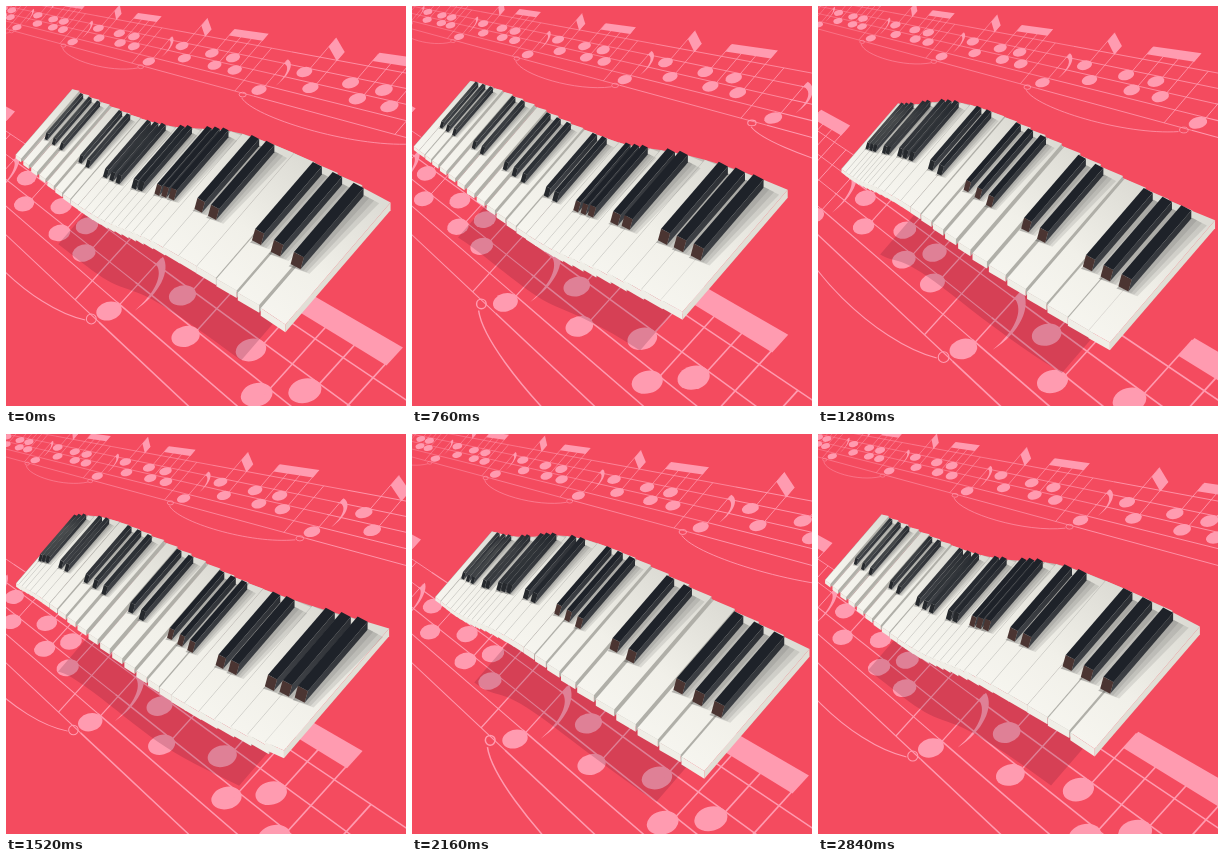
An HTML page with a canvas that plays this animation: 400x400 px, repeating every 2880 ms.

```html
<!DOCTYPE html>
<html lang="en">
<head>
<meta charset="utf-8">
<title>Piano wave</title>
<style>
  html, body { margin: 0; width: 100%; height: 100%; overflow: hidden; background: #f44b5f; }
  canvas { display: block; width: 100vw; height: 100vh; }
</style>
</head>
<body>
<canvas id="stage" width="400" height="400"></canvas>
<script>
const ctx = document.getElementById('stage').getContext('2d');
const LOOP = 2880, STEP = 40, TAU = Math.PI * 2;
const RED = '#f44b5f', PINK = '#ff9bb0';

function polygon(points, fill) {
  ctx.beginPath();
  points.forEach(([x, y]) => ctx.lineTo(x, y));
  ctx.closePath();
  ctx.fillStyle = fill;
  ctx.fill();
}

function line(a, b, color, width) {
  ctx.beginPath();
  ctx.moveTo(...a);
  ctx.lineTo(...b);
  ctx.strokeStyle = color;
  ctx.lineWidth = width;
  ctx.stroke();
}

const add = ([x, y], [dx, dy], k = 1) => [x + dx * k, y + dy * k];

// ---- Music staves: u runs away along the staff, v runs across it ----

const BAR = 720;
const NOTES = [[0, 0], [-126, 57], [-203, 29], [-335, 55], [-405, 29], [-467, 55], [-528, 29]];
const STEM_TOPS = [74, 138, 112, 120, 121, 122, 123];
const LINES = [-15, 12, 39, 66, 93];
const STEM = -11;

// Slurs join every second pair of bars; slurParity tells which pair
const staves = [
  { vanish: [-350, -72], origin: [603, 156], across: [.351, -.41], depth: 3220, bars: 5,
    note: [7.8, 4.7], ring: [3.6, 2.4], stroke: .75, slurParity: 0, near: 2, far: 7 },
  { vanish: [-390, -137], origin: [493, 442], across: [.67, -.74], depth: 2023, bars: 4,
    note: [12.9, 9.3], ring: [5, 5], stroke: 1.25, slurParity: 1, near: 2, far: 2 },
];

function drawStaff(staff, time) {
  const travel = time / LOOP * staff.bars * BAR;
  const scale = u => staff.depth / (staff.depth + u);
  const at = (u, v) => {
    const s = scale(u);
    return staff.vanish.map((c, i) => c + s * (staff.origin[i] + v * staff.across[i]));
  };
  const segment = (u1, v1, u2, v2) =>
    line(at(u1, v1), at(u2, v2), PINK, staff.stroke * scale((u1 + u2) / 2));
  const oval = (u, v, [rx, ry], tilt) => {
    const s = scale(u);
    ctx.beginPath();
    ctx.ellipse(...at(u, v), rx * s, ry * s, tilt, 0, TAU);
  };

  function drawBar(base) {
    LINES.forEach(v => segment(base, v, base - BAR, v));
    segment(base - 615, -15, base - 615, 93);

    ctx.fillStyle = PINK;
    NOTES.forEach(([du, v], i) => {
      const u = base + du;
      oval(u, v, staff.note, -.25);
      ctx.fill();
      segment(u + STEM, v + 4, u + STEM, STEM_TOPS[i]);
    });

    const beam = (u1, v1, u2, v2, width) => polygon(
      [at(base + u1, v1), at(base + u2, v2), at(base + u2, v2 - width), at(base + u1, v1 - width)], PINK);
    beam(-137, 138, -217, 112, 21);
    beam(-346, 122, -542, 124, 18);

    // Tapered flag of the single quaver
    const flag = (u, v) => at(base + u, v);
    ctx.beginPath();
    ctx.moveTo(...flag(STEM, 76));
    ctx.bezierCurveTo(...flag(-55, 70), ...flag(-78, 45), ...flag(-56, 17));
    ctx.bezierCurveTo(...flag(-66, 43), ...flag(-48, 62), ...flag(STEM, 66));
    ctx.fill();
  }

  // Slur with a small ring at each end
  function drawSlur(base) {
    const start = base + 55, end = base - BAR + 24;
    ctx.strokeStyle = PINK;
    ctx.lineWidth = staff.stroke * scale((start + end) / 2);
    ctx.beginPath();
    ctx.moveTo(...at(start - 8, -25));
    ctx.bezierCurveTo(...at(start - 130, -56), ...at(end + 180, -56), ...at(end + 12, -23));
    ctx.stroke();
    for (const u of [start, end]) {
      oval(u, -18, staff.ring, 0);
      ctx.stroke();
    }
  }

  const current = Math.floor(travel / BAR);
  for (let n = current - staff.far; n <= current + staff.near; n++) {
    const base = travel - n * BAR;
    if (staff.depth + base - BAR < 200) continue;
    drawBar(base);
    if (Math.abs(n % 2) === staff.slurParity) drawSlur(base);
  }
}

// ---- Keyboard: i counts white keys from the far left ----

const WHITE_KEYS = 25;
const BLACK_KEYS = [1.15, 2, 2.85, 5.08, 5.92, 8.15, 9, 9.85, 12.08, 12.92,
  15.15, 16, 16.85, 19.08, 19.92, 22.15, 23, 23.85];
const FRONT = -.54, BACK = 1.03;

function rest(i) {
  const x = -242.8 + 13498 / (48.88 - i) - 6 * Math.exp(-(((i - 18.5) / 3) ** 2));
  return [x, 133.5 + .526 * (x - 40)];
}

function wave(i, time) {
  const crest = 276 - 36 * i - .12 * i * i;
  const swing = Math.cos(TAU * (time - crest) / 960);
  return [11 * swing, (11.5 + .17 * i) * swing];
}

const place = (i, time) => add(rest(i), wave(i, time));
const edge = (i, time) => place(i - .2, time);
const lengthAt = i => { const g = 36 + 1.24 * i; return [g, -1.16 * g]; };
const span = (i, width) => add([0, 0], add(rest(i + 1), rest(i), -1), width);

function drawShadow(time) {
  const front = [], back = [];
  for (let i = 0; i <= WHITE_KEYS; i++) {
    const p = (rest(i)[0] - 33) / 289;
    const point = add([54 + 182 * p, 240 + 116 * p], wave(i, time), .75);
    front.push(point);
    back.unshift(add(point, lengthAt(i), .95));
  }
  polygon([...front, ...back], 'rgba(95, 20, 45, .2)');
}

function drawWhiteKey(i, time) {
  const last = i === WHITE_KEYS - 1;
  const p = edge(i, time), next = edge(i + 1, time);
  const q = last ? next : add(p, span(i, 1.03));
  const reach = lengthAt(i), reachRight = lengthAt(i + 1);
  const drop = [0, 3.5 + .18 * i];
  const frontLeft = add(p, reach, FRONT), backLeft = add(p, reach, BACK);
  const frontRight = add(q, reachRight, FRONT), backRight = add(q, reachRight, BACK);

  if (!last) {
    polygon([frontLeft, backLeft, add(next, reachRight, BACK), add(next, reachRight, FRONT)], '#bfbeb7');
  }
  polygon([frontRight, backRight, add(backRight, drop), add(frontRight, drop)], last ? '#e1dfd6' : '#b0afa8');
  polygon([frontLeft, frontRight, add(frontRight, drop), add(frontLeft, drop)], '#f0eee7');

  const shade = ctx.createLinearGradient(...frontLeft, ...backLeft);
  shade.addColorStop(0, '#f6f5ef');
  shade.addColorStop(.4, '#f1f0e9');
  shade.addColorStop(1, '#dddcd5');
  polygon([frontLeft, backLeft, backRight, frontRight], shade);
  line(frontLeft, backLeft, 'rgba(125, 125, 120, .3)', .6);
}

function blackKeyShape(i, time) {
  return {
    base: add(place(i, time), span(i, -.3)),
    width: span(i, .44),
    reach: lengthAt(i),
    lift: [0, -(4 + .17 * i)],
  };
}

// Soft shade that fades to the right of a black key
function drawContactShadow(i, time) {
  const { base, width, reach } = blackKeyShape(i, time);
  const near = add(base, width), far = add(near, reach, .97);
  for (const spread of [.5, 1, 1.5]) {
    polygon([add(base, reach, -.03), far, add(far, width, spread), add(near, width, spread * .6)],
      'rgba(65, 65, 65, .13)');
  }
}

function drawBlackKey(i, time) {
  const { base, width, reach, lift } = blackKeyShape(i, time);
  const frontLeft = add(add(base, reach, .05), lift);
  const backLeft = add(add(base, reach, .96), lift);
  const frontRight = add(frontLeft, width), backRight = add(backLeft, width);
  const bottomRight = add(base, width);
  const gloss = Math.max(0, 1 - i / 15);

  const side = ctx.createLinearGradient(...bottomRight, ...backRight);
  side.addColorStop(0, '#404348');
  side.addColorStop(1, '#2b2e33');
  polygon([frontRight, backRight, add(backRight, lift, -1), bottomRight], side);
  polygon([base, frontLeft, frontRight, bottomRight], i > 14 ? '#4b3532' : '#26292d');

  const tone = k => `rgb(${30 + 48 * k}, ${34 + 47 * k}, ${41 + 41 * k})`;
  const shine = ctx.createLinearGradient(...frontLeft, ...backLeft);
  shine.addColorStop(0, tone(gloss * .85));
  shine.addColorStop(.65, tone(gloss));
  shine.addColorStop(1, tone(gloss * .35));
  polygon([frontLeft, backLeft, backRight, frontRight], shine);
}

function draw(time) {
  ctx.fillStyle = RED;
  ctx.fillRect(0, 0, 400, 400);
  staves.forEach(staff => drawStaff(staff, time));
  drawShadow(time);
  for (let i = 0; i < WHITE_KEYS; i++) drawWhiteKey(i, time);
  BLACK_KEYS.forEach(i => drawContactShadow(i, time));
  BLACK_KEYS.forEach(i => drawBlackKey(i, time));
}

const startTime = performance.now();
function tick() {
  const elapsed = (performance.now() - startTime) % LOOP;
  draw(Math.floor(elapsed / STEP) * STEP);
  requestAnimationFrame(tick);
}
tick();
</script>
</body>
</html>
```
